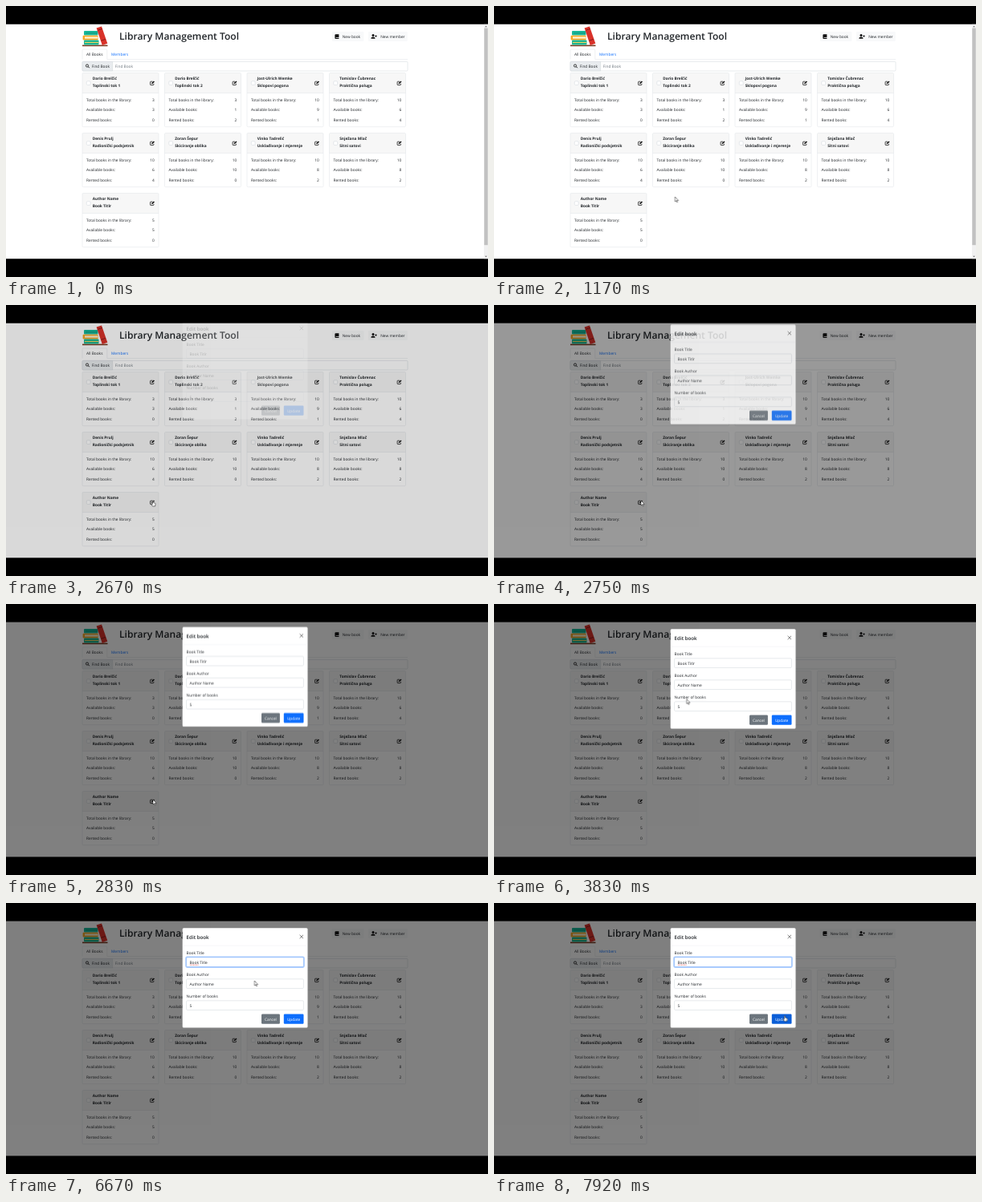
An HTML page that plays this animation: 600 px wide and 338 px high, repeating every 8000 ms.

```html
<!DOCTYPE html>
<html lang="en">
<head>
<meta charset="utf-8">
<title>Library Management Tool</title>
<style>
  html, body { margin: 0; width: 100%; height: 100%; overflow: hidden; background: #000; }
  svg { display: block; width: 600px; height: 338px; }
  text { font: 4.8px "Open Sans", "Noto Sans", sans-serif; fill: #212529; text-rendering: geometricPrecision; }
  .h1 { font-size: 12.1px; font-weight: 600; }
  .h5 { font-size: 6.2px; font-weight: 600; }
  .b { font-weight: 700; }
  .muted { fill: #6c757d; }
  .link { fill: #0d6efd; }
  .end { text-anchor: end; }
  .mid { text-anchor: middle; fill: #fff; }
  .light { fill: #f8f9fa; }
  .box { fill: #fff; stroke: #ced4da; stroke-width: .5; }
  .line { fill: none; stroke: #dee2e6; stroke-width: .5; }
  .wave { fill: none; stroke: #e03030; stroke-width: .6; stroke-dasharray: 1 .4; }

  .anim { animation: 8s step-end -5ms infinite; }
  #scroll { animation-name: scroll; }
  #shade { animation-name: shade; }
  #modal { animation-name: modal; }
  #focus { animation-name: focus; }
  #caret { animation-name: caret; }
  #tail { animation-name: tail; }
  #last-r { animation-name: last-r; }
  #last-e { animation-name: last-e; }
  #wave { animation-name: wave; }
  #update { animation-name: hover; }
  #cursor { animation-name: move; }
  #arrow { animation-name: arrow; }
  #hand { animation-name: hand; }
  #beam { animation-name: beam; }

  @keyframes scroll { 0% { opacity: 1 } 33.33%, 100% { opacity: 0 } }
  @keyframes shade { 0% { opacity: 0 } 33.33% { opacity: .15 } 34.37% { opacity: .4 } 35.42%, 100% { opacity: .5 } }
  @keyframes modal {
    0% { opacity: 0; transform: translateY(-15.6px) }
    33.33% { opacity: .2; transform: translateY(-13px) }
    34.37% { opacity: .8; transform: translateY(-6.8px) }
    35.42% { opacity: 1; transform: translateY(-2.5px) }
    36.46% { opacity: 1; transform: translateY(-.3px) }
    37.5%, 100% { opacity: 1; transform: none }
  }
  @keyframes focus { 0% { opacity: 0 } 56.25% { opacity: .5 } 57.29%, 100% { opacity: 1 } }
  @keyframes caret {
    0% { opacity: 0; transform: none }
    56.25% { opacity: 1; transform: none }
    62.5% { opacity: 0; transform: none }
    68.75% { opacity: 1; transform: translateX(-1.9px) }
    71.87% { opacity: 1; transform: translateX(.9px) }
    80.21% { opacity: 0; transform: translateX(.9px) }
    87.5% { opacity: 1; transform: translateX(.9px) }
    93.75%, 100% { opacity: 0; transform: translateX(.9px) }
  }
  @keyframes wave { 0% { opacity: 0 } 56.25%, 100% { opacity: 1 } }
  @keyframes tail { 0% { opacity: 1; stroke-width: .6 } 72.92%, 100% { opacity: 0 } }
  @keyframes last-r { 0% { opacity: 1 } 68.75%, 100% { opacity: 0 } }
  @keyframes last-e { 0% { opacity: 0 } 71.87%, 100% { opacity: 1 } }
  @keyframes hover { 0% { fill: #0d6efd } 92.71%, 100% { fill: #0b5ed7 } }
  @keyframes move {
    0% { transform: translate(346px, 321px) }
    2.08% { transform: translate(346px, 321px); animation-timing-function: steps(6) }
    8.33% { transform: translate(292px, 242px) }
    9.38% { transform: translate(292px, 242px); animation-timing-function: steps(4) }
    13.54% { transform: translate(238px, 236px); animation-timing-function: steps(6) }
    19.79% { transform: translate(162px, 248px); animation-timing-function: steps(2) }
    21.88% { transform: translate(186px, 246px) }
    23.96% { transform: translate(187px, 242px) }
    25% { transform: translate(187px, 242px); animation-timing-function: steps(4) }
    29.17% { transform: translate(183px, 244px) }
    35.42% { transform: translate(183px, 244px); animation-timing-function: steps(8) }
    43.75% { transform: translate(222px, 154px); animation-timing-function: steps(9) }
    53.12% { transform: translate(262px, 74px); animation-timing-function: steps(9) }
    62.5% { transform: translate(272px, 76px) }
    81.25% { transform: translate(272px, 76px); animation-timing-function: steps(6) }
    87.5% { transform: translate(384px, 139px); animation-timing-function: steps(4) }
    91.67% { transform: translate(366px, 138px); animation-timing-function: steps(7) }
    98.96%, 100% { transform: translate(362px, 140.5px) }
  }
  @keyframes arrow {
    0% { opacity: 1 } 28.12% { opacity: 0 } 34.37% { opacity: 1 }
    52.08% { opacity: 0 } 82.29% { opacity: 1 } 92.71%, 100% { opacity: 0 }
  }
  @keyframes hand { 0% { opacity: 0 } 28.12% { opacity: 1 } 34.37% { opacity: 0 } 92.71%, 100% { opacity: 1 } }
  @keyframes beam { 0% { opacity: 0 } 52.08% { opacity: 1 } 82.29%, 100% { opacity: 0 } }
</style>
</head>
<body>
<svg viewBox="0 0 600 338" xmlns="http://www.w3.org/2000/svg">
  <defs>
    <g id="edit">
      <path d="M3.3 1H1Q.4 1 .4 1.6V4.8Q.4 5.4 1 5.4H4.1Q4.7 5.4 4.7 4.8V3.6" fill="none" stroke="#111" stroke-width=".75"/>
      <path d="M1.9 4.1L2.1 2.8 4.7 .2 5.8 1.3 3.2 3.9Z" fill="#111"/>
    </g>
  </defs>

  <rect y="22.5" width="600" height="293" fill="#fff"/>

  <g id="books">
    <rect x="95" y="48.6" width="31.5" height="1.6" fill="#7a3b22"/>
    <rect x="97" y="31" width="17.5" height="5.6" rx="1" fill="#18b99a"/>
    <path d="M99 33.8H114" stroke="#0d8b78" stroke-width=".8"/>
    <rect x="95.6" y="36.8" width="19" height="5.6" rx="1" fill="#f5a623"/>
    <rect x="98" y="38.3" width="16.5" height="2.4" fill="#fff3cf"/>
    <rect x="97" y="42.6" width="18.5" height="5.8" rx="1" fill="#1fb58f"/>
    <path d="M98 45.5H115" stroke="#f4d35e" stroke-width="1"/>
    <path d="M112.6 27.6L119 25.4 126.3 46.8 119.8 48.9Z" fill="#d9322a"/>
    <path d="M114.3 30.2L119.7 28.4M118.6 43.2L124 41.4" stroke="#8e1b1b" stroke-width="1"/>
  </g>
  <text class="h1" x="141" y="41.9">Library Management Tool</text>

  <rect class="light" x="405.8" y="32" width="39.6" height="12" rx="1.2"/>
  <path d="M410.4 35.2H414.4V39.3H410.6V40.1H414.4V40.9H410.4Q409.4 40.9 409.4 39.9V36.2Q409.4 35.2 410.4 35.2Z" fill="#111"/>
  <text x="418.7" y="39.8">New book</text>
  <rect class="light" x="451" y="32" width="48.8" height="12" rx="1.2"/>
  <g fill="#111">
    <circle cx="457" cy="36.6" r="1.5"/>
    <path d="M454.4 40.8Q454.4 38.5 457 38.5T459.6 40.8ZM459.1 37.2H460.1V36.2H460.8V37.2H461.8V37.9H460.8V38.9H460.1V37.9H459.1Z"/>
  </g>
  <text x="466.2" y="39.8">New member</text>

  <path class="line" d="M95 66.5V55.3Q95 54 96.2 54H124.6Q125.8 54 125.8 55.3V66.5H500"/>
  <text x="100" y="62">All Books</text>
  <text class="link" x="131" y="62">Members</text>

  <rect class="box" x="95" y="69.4" width="405" height="11.6" rx="1.2"/>
  <path d="M96.2 69.4H132.6V81H96.2Q95 81 95 79.8V70.6Q95 69.4 96.2 69.4Z" fill="#e9ecef" stroke="#ced4da" stroke-width=".5"/>
  <path d="M102.3 75.6L103.8 77.2" stroke="#111" stroke-width="1"/>
  <circle cx="101" cy="74.5" r="1.6" fill="none" stroke="#111" stroke-width=".8"/>
  <text x="106.7" y="77">Find Book</text>
  <text class="muted" x="135.8" y="77">Find Book</text>

  <g id="cards"></g>

  <g id="scroll" class="anim">
    <rect x="595" y="22.5" width="5" height="293" fill="#f1f1f1"/>
    <rect x="595.3" y="27.6" width="4.4" height="270.6" fill="#c1c1c1"/>
    <path d="M596.4 26.2L597.5 24.8 598.6 26.2ZM596.4 311.8L597.5 313.2 598.6 311.8Z" fill="#505050"/>
  </g>

  <rect id="shade" class="anim" y="22.5" width="600" height="293" fill="#000"/>

  <g id="modal" class="anim">
    <rect x="219.7" y="31.2" width="155.8" height="124.4" rx="1.5" fill="#fff"/>
    <text class="h5" x="224.6" y="44.6">Edit book</text>
    <path d="M365.6 39.8L370 44.2M370 39.8L365.6 44.2" stroke="#555" stroke-width=".75"/>
    <path class="line" d="M219.7 53.2H375.5" stroke-opacity=".5"/>
    <g id="fields"></g>
    <g id="focus" class="anim">
      <rect x="224" y="67.2" width="147" height="12.9" rx="1.6" fill="none" stroke="#0d6efd" stroke-opacity=".35" stroke-width="1.6"/>
      <rect x="224.6" y="67.8" width="145.8" height="11.7" rx="1.2" fill="#fff" stroke="#86b7fe" stroke-width=".6"/>
    </g>
    <text x="228.5" y="75.7">Book Titl<tspan id="last"></tspan></text>
    <g id="wave" class="anim">
      <path class="wave" d="M228.8 77.2H239.6"/>
      <g id="tail" class="anim"><path class="wave" d="M241 77.2H248.2"/><path id="last-r" class="wave anim" d="M248.2 77.2H250.4"/></g>
    </g>
    <path id="caret" class="anim" d="M250.4 70.6V76.8" stroke="#111" stroke-width=".5"/>
    <rect x="318" y="138.6" width="22.9" height="12.2" rx="1.2" fill="#6c757d"/>
    <text class="mid" x="329.4" y="146.5">Cancel</text>
    <rect id="update" class="anim" x="345.8" y="138.6" width="24.7" height="12.2" rx="1.2" fill="#0d6efd"/>
    <text class="mid" x="358.1" y="146.5">Update</text>
  </g>

  <g id="cursor" class="anim">
    <path id="arrow" class="anim" d="M0 0V6L1.4 4.8 2.3 6.9 3.2 6.5 2.3 4.5H4.2Z" fill="#fff" stroke="#000" stroke-width=".45"/>
    <path id="hand" class="anim" d="M-.7 .5Q0 -.3 .6 .5V2.6L2.6 3.2Q3.1 3.4 3 4.2L2.6 7H-.5L-2 4.8Q-2.1 4 -1.3 4.1L-.7 4.6Z" fill="#fff" stroke="#000" stroke-width=".5"/>
    <path id="beam" class="anim" d="M-1.1 -2.6H1.1M0 -2.6V2.8M-1.1 2.8H1.1" fill="none" stroke="#111" stroke-width=".6"/>
  </g>

  <path d="M0 0H600V22.5H0ZM0 315.5H600V338H0Z" fill="#000"/>
</svg>
<script>
  const $ = id => document.getElementById(id);
  const text = (x, y, s, cls = '') => `<text class="${cls}" x="${x}" y="${y}">${s}</text>`;

  // author, title, total, available
  const books = [
    ['Dario Brelčić', 'Toplinski tok 1', 3, 3],
    ['Dario Brelčić', 'Toplinski tok 2', 3, 1],
    ['Jost-Ulrich Wemke', 'Sklopovi pogona', 10, 9],
    ['Tomislav Čubrenac', 'Praktična poluga', 10, 6],
    ['Denis Prulj', 'Radionički podsjetnik', 10, 6],
    ['Zoran Šepur', 'Skiciranje oblika', 10, 10],
    ['Vinko Tadrelić', 'Usklađivanje i mjerenje', 10, 8],
    ['Snježana Mlač', 'Sitni satovi', 10, 8],
    ['Author Name', 'Book Titlr', 5, 5]
  ];

  const card = ([author, title, total, free], i) => {
    const rows = [['Total books in the library:', total], ['Available books:', free], ['Rented books:', total - free]];
    return `<g transform="translate(${95 + i % 4 * 102.5} ${83.5 + (i / 4 | 0) * 75})">
      <rect width="95" height="67.2" rx="1.2" fill="#fff"/>
      <rect width="95" height="25" rx="1.2" fill="#f7f7f7"/>
      <path class="line" d="M0 25H95"/>
      <rect class="line" width="95" height="67.2" rx="1.2"/>
      <rect class="box" x="5.3" y="10.2" width="4.8" height="4.8" rx="1.2"/>
      ${text(12.7, 8.2, author, 'b')}${text(12.7, 17.8, title, 'b')}
      <use href="#edit" x="84.2" y="9.7"/>
      ${rows.map(([label, n], r) => text(5, 35.3 + r * 12.6, label) + text(89.8, 35.3 + r * 12.6, n, 'end')).join('')}
    </g>`;
  };
  $('cards').innerHTML = books.map(card).join('');

  const field = ([label, value], i) => {
    const y = 63.6 + i * 27;
    return text(224.6, y, label) +
      `<rect class="box" x="224.6" y="${y + 4.2}" width="145.8" height="11.7" rx="1.2"/>` +
      text(228.5, y + 12.1, value);
  };
  $('fields').innerHTML = [['Book Title', ''], ['Book Author', 'Author Name'], ['Number of books', 5]].map(field).join('');

  // The last letter of the edited title swaps from r to e.
  const last = $('last'), start = performance.now();
  const type = now => {
    const t = (now - start + 5 + 8000) % 8000;
    const s = t < 5500 ? 'r' : t < 5750 ? '' : 'e';
    if (last.textContent !== s) last.textContent = s;
    requestAnimationFrame(type);
  };
  type(start);
</script>
</body>
</html>
```
